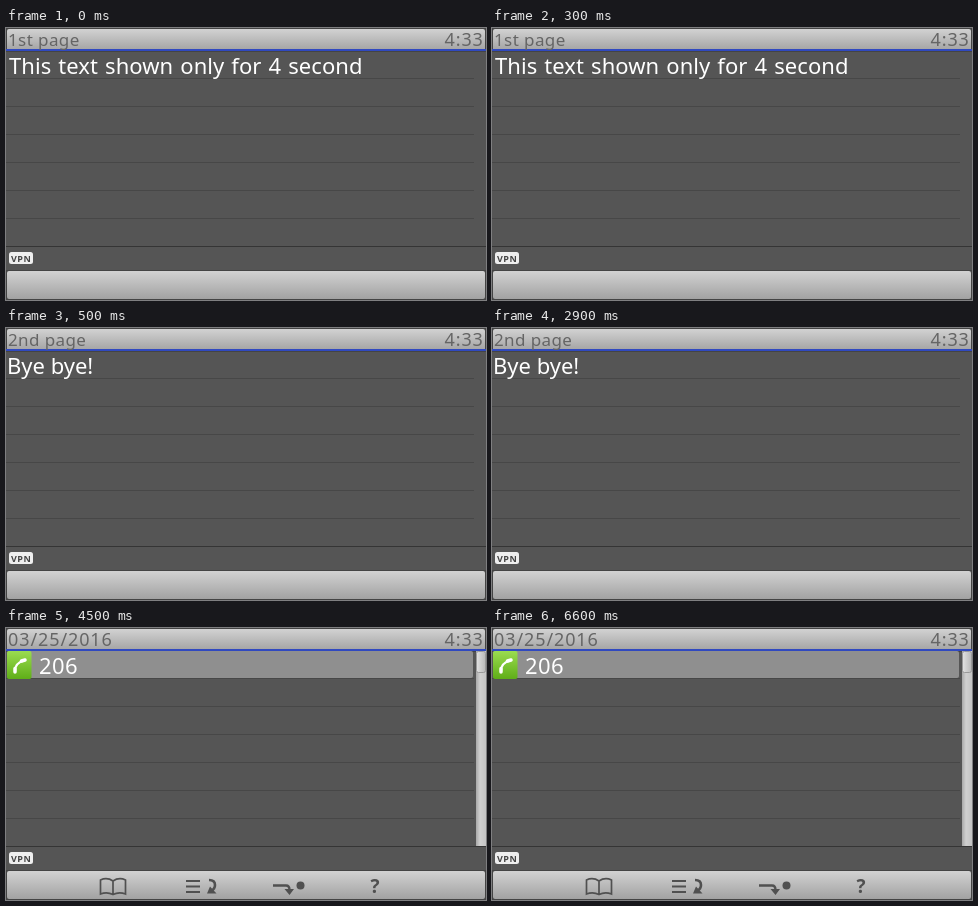
Write an HTML page that moves like this. It is 480x272 px and loops after 8000 ms.

```html
<!DOCTYPE html>
<html lang="en">
<head>
<meta charset="utf-8">
<title>Phone display</title>
<style>
  html, body { margin: 0; width: 100%; height: 100%; overflow: hidden; background: #555; }
  svg { display: block; width: 480px; height: 272px; }
  text { font-family: "Noto Sans", "Open Sans", sans-serif; }
  .title { font-size: 17px; letter-spacing: .4px; fill: #656565; }
  .digits { font-size: 18px; letter-spacing: .9px; }
  .body { font-size: 22px; fill: #fff; }
  .page { opacity: 0; }
</style>
</head>
<body>
<svg viewBox="0 0 480 272">
  <defs>
    <linearGradient id="bar" x2="0" y2="1">
      <stop stop-color="#d2d2d2"/><stop offset="1" stop-color="#a2a2a2"/>
    </linearGradient>
    <linearGradient id="green" x2="0" y2="1">
      <stop stop-color="#9bdc50"/><stop offset="1" stop-color="#5fae18"/>
    </linearGradient>
    <linearGradient id="track">
      <stop stop-color="#a8a8a8"/><stop offset=".4" stop-color="#d0d0d0"/><stop offset="1" stop-color="#c4c4c4"/>
    </linearGradient>
    <linearGradient id="thumb">
      <stop stop-color="#e2e2e2"/><stop offset="1" stop-color="#b8b8b8"/>
    </linearGradient>
  </defs>

  <rect width="480" height="272" fill="#555"/>
  <path id="rules" stroke="#474747"/>
  <path d="M0 218.5H480" stroke="#353535"/>

  <rect width="480" height="24" fill="#444"/>
  <rect x="1" y="1" width="478" height="22" rx="2" fill="url(#bar)"/>
  <rect y="21" width="480" height="2" fill="#3049c0"/>
  <text class="title digits" x="438.5" y="18">4:33</text>

  <rect x="3" y="224" width="24" height="12" rx="2.5" fill="#eee"/>
  <text x="5" y="233.5" font-size="9" font-weight="700" letter-spacing=".5" fill="#444">VPN</text>

  <rect y="242" width="480" height="30" fill="#444"/>
  <rect x="1" y="243" width="478" height="28" rx="2" fill="url(#bar)"/>

  <g class="page">
    <text class="title" x="2" y="18">1st page</text>
    <text class="body" x="3" y="45.5" letter-spacing=".05" word-spacing="1.3">This text shown only for 4 second</text>
  </g>

  <g class="page">
    <text class="title" x="2" y="18">2nd page</text>
    <text class="body" x="1" y="45.5">Bye bye!</text>
  </g>

  <g class="page">
    <text class="title digits" x="2" y="18">03/25/2016</text>

    <rect x="1" y="23" width="466" height="27" rx="2" fill="#8f8f8f"/>
    <rect x="1" y="23" width="24.5" height="28" rx="2" fill="url(#green)"/>
    <path d="M9 43Q9 35 18 32.5" fill="none" stroke="#fff" stroke-width="2.2"/>
    <path d="M9 40.5V44M15.5 33L19 32" stroke="#fff" stroke-width="3.5" stroke-linecap="round"/>
    <text class="body" x="33" y="45.5" letter-spacing=".4">206</text>

    <rect x="470" y="23" width="10" height="195" fill="url(#track)"/>
    <rect x="470.5" y="23.5" width="9" height="21" rx="2" fill="url(#thumb)" stroke="#999"/>

    <g fill="none" stroke="#505050" stroke-width="2">
      <path d="M107 253Q101 249 94.500 252V266Q101 263.500 107 266.500Q113 263.500 119.500 266V252Q113 249 107 253V266" stroke-width="1.7"/>
      <path d="M180 253H194M180 258.500H194M180 264H194"/>
      <path d="M203 252Q209 252 209 257Q209 261 205 263" stroke-width="2.6"/>
      <path d="M267 257.500H280Q283.500 257.500 283.500 262" stroke-width="2.4"/>
      <g fill="#505050" stroke="none">
        <path d="M201 265.500L204 258.500L210.500 265.500ZM278.500 261H288L283.500 267Z"/>
        <circle cx="294.500" cy="257.500" r="4"/>
        <text x="364.500" y="265" font-size="19" font-weight="600">?</text>
      </g>
    </g>
  </g>
</svg>
<script>
  const LOOP = 8000;
  const starts = [0, 500, 4500];
  const pages = document.querySelectorAll('.page');

  const rules = Array.from({ length: 6 }, (_, i) => `M0 ${50.5 + 28 * i}H468`);
  document.getElementById('rules').setAttribute('d', rules.join(''));

  function render(now) {
    const time = now % LOOP;
    const current = starts.findLastIndex(start => time >= start);
    pages.forEach((page, i) => { page.style.opacity = i === current ? 1 : 0; });
  }

  const origin = performance.now();
  function tick() {
    render(performance.now() - origin);
    requestAnimationFrame(tick);
  }
  tick();
</script>
</body>
</html>
```
